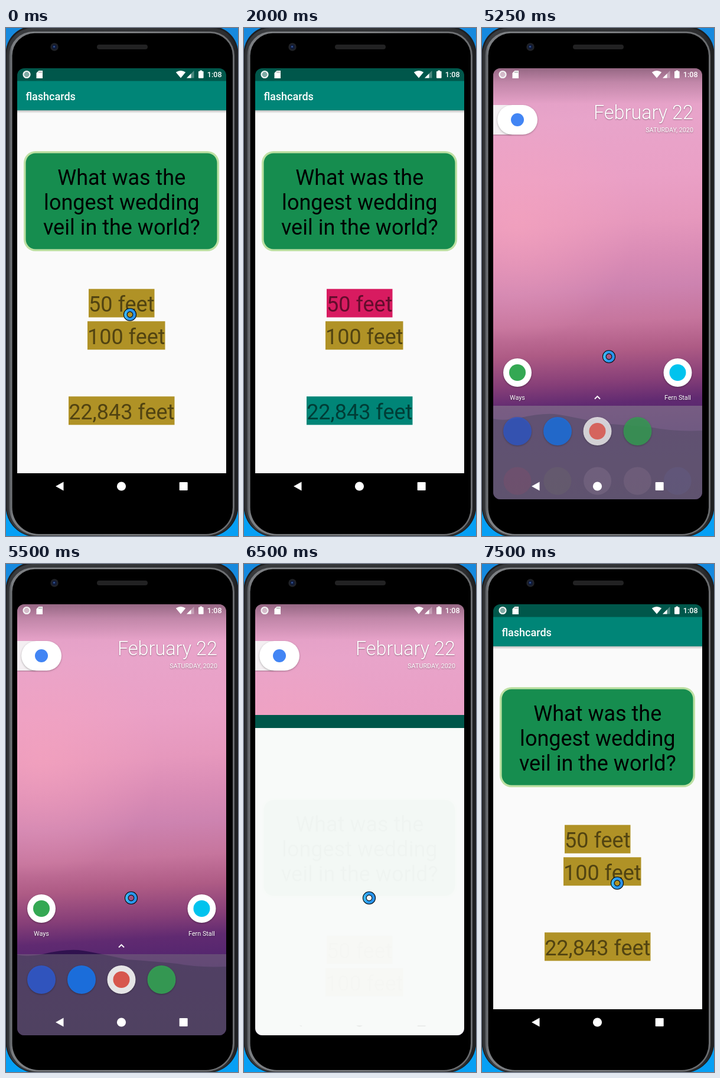
These frames come from a looping animation (393x858 px, 8000 ms). An HTML page with a canvas:

```html
<!DOCTYPE html>
<html lang="en">
<head>
<meta charset="utf-8">
<title>Flashcards</title>
<style>
  html, body { margin: 0; width: 100%; height: 100%; overflow: hidden; background: #1487de; }
  canvas { display: block; width: 393px; height: 858px; }
</style>
</head>
<body>
<canvas id="stage"></canvas>
<script>
const W = 393, H = 858, LOOP = 8000;
const canvas = document.getElementById('stage');
const ratio = window.devicePixelRatio || 1;
canvas.width = Math.round(W * ratio);
canvas.height = Math.round(H * ratio);
const ctx = canvas.getContext('2d');

const SCREEN = { x: 19, y: 68, w: 354, h: 728 };
const GOLD = '#b09226', TEAL = '#008577', DARK_TEAL = '#00574b', PINK = '#d81b60';

// Each step: start time, scene, busy cursor position
const steps = [
  { at: 0, draw: () => app(), cursor: [210, 484] },
  { at: 250, draw: () => app(), cursor: [206, 475] },
  { at: 1000, draw: () => app(true), cursor: [211, 481] },
  { at: 2000, draw: () => app(true) },
  { at: 4750, draw: () => blank(), cursor: [218, 536] },
  { at: 5250, draw: () => home(35), cursor: [215, 555] },
  { at: 5500, draw: () => home(14), cursor: [212, 564] },
  { at: 5750, draw: () => home(0), cursor: [212, 564] },
  { at: 6500, draw: () => opening(255), cursor: [212, 564] },
  { at: 6750, draw: () => app(), cursor: [204, 564] },
  { at: 7250, draw: () => app(), cursor: [229, 539] }
];

function gradient(x0, y0, x1, y1, stops) {
  const g = ctx.createLinearGradient(x0, y0, x1, y1);
  stops.forEach(([p, c]) => g.addColorStop(p, c));
  return g;
}

function rect(x, y, w, h, fill) {
  ctx.fillStyle = fill;
  ctx.fillRect(x, y, w, h);
}

function roundPath(x, y, w, h, r) {
  ctx.beginPath();
  ctx.roundRect(x, y, w, h, r);
}

function round(x, y, w, h, r, fill) {
  roundPath(x, y, w, h, r);
  ctx.fillStyle = fill;
  ctx.fill();
}

function disc(x, y, r, fill) {
  ctx.beginPath();
  ctx.arc(x, y, r, 0, Math.PI * 2);
  ctx.fillStyle = fill;
  ctx.fill();
}

function ring(x, y, r, width, stroke) {
  ctx.beginPath();
  ctx.arc(x, y, r, 0, Math.PI * 2);
  ctx.lineWidth = width;
  ctx.strokeStyle = stroke;
  ctx.stroke();
}

function poly(points, fill) {
  ctx.beginPath();
  points.forEach(([x, y]) => ctx.lineTo(x, y));
  ctx.closePath();
  ctx.fillStyle = fill;
  ctx.fill();
}

function text(str, x, y, size, fill, align = 'center', weight = 400) {
  ctx.font = `${weight} ${size}px Roboto, sans-serif`;
  ctx.textAlign = align;
  ctx.fillStyle = fill;
  ctx.fillText(str, x, y);
}

function shaded(blur, dy, alpha, draw) {
  ctx.save();
  ctx.shadowColor = `rgba(0,0,0,${alpha})`;
  ctx.shadowBlur = blur * ratio;
  ctx.shadowOffsetY = dy * ratio;
  draw();
  ctx.restore();
}

function phone() {
  rect(0, 0, W, H, gradient(0, 0, 0, H, [[0, '#1689de'], [1, '#06a0f5']]));
  round(-0.5, -3, 394, 862.5, [46, 46, 52, 52], '#1d1e20');
  round(1.5, 0, 390, 858.5, [44, 44, 50, 50],
    gradient(0, 0, W, 0, [[0, '#303235'], [0.05, '#3a3c3f'], [0.95, '#2c2d2f'], [1, '#1e1f21']]));
  // Lit inner edge, wider on the left
  round(5.5, 6, 381.5, 851, [41, 41, 48, 48],
    gradient(0, 0, W, 0, [[0.014, '#54575b'], [0.028, '#7b7e82'], [0.5, '#85878a'], [1, '#696b6e']]));
  round(10.5, 8.8, 373.5, 846, [38, 38, 45, 45], '#000');

  round(154, 28, 86, 8, 4, '#222223');
  disc(82, 32, 6.7, '#202227');
  disc(82, 32, 4, '#101a38');
  disc(81.5, 31.5, 1.6, '#315395');
}

function statusIcons() {
  disc(35, 78.5, 4.6, 'rgba(255,255,255,.5)');
  ring(35, 78.5, 5.5, 2.2, '#f5f6f6');
  poly([[55.5, 72], [62, 72], [62, 85], [51.5, 85], [51.5, 76]], '#fff');
  [55.4, 57.5, 59.6].forEach(x => rect(x, 73.5, 1, 2.2, 'rgba(60,70,70,.7)'));

  ctx.beginPath();
  ctx.moveTo(296, 84.5);
  ctx.lineTo(287.8, 74.8);
  ctx.quadraticCurveTo(296, 69, 304.2, 74.8);
  ctx.closePath();
  ctx.fillStyle = '#fff';
  ctx.fill();

  poly([[306, 84.5], [318.5, 84.5], [318.5, 72]], 'rgba(255,255,255,.3)');
  poly([[306, 84.5], [313.5, 84.5], [313.5, 77]], '#fff');
  round(326, 73, 8.6, 11.8, 1, '#fff');
  rect(328.4, 71.6, 3.8, 2, '#fff');
  text('1:08', 365.6, 83.4, 12.6, '#fff', 'right', 500);
}

function navIcons(fill = '#fff') {
  poly([[84, 774], [97.5, 766.5], [97.5, 781.5]], fill);
  disc(195.5, 774, 7.6, fill);
  round(293.7, 767, 14, 14, 1, fill);
}

function answer(str, x, y, w, fill) {
  rect(x, y, w, 48, fill);
  text(str, x + w / 2, y + 38.4, 36, 'rgba(0,0,0,.54)');
}

function cards(marked) {
  round(30, 208, 331, 169, 20, '#bde0a3');
  round(33.5, 211.5, 324, 162, 16.5, '#168d4f');
  ['What was the', 'longest wedding', 'veil in the world?'].forEach((line, i) =>
    text(line, 195.8, 265 + i * 42.2, 36, '#000'));
  answer('50 feet', 140, 440.7, 111.5, marked ? PINK : GOLD);
  answer('100 feet', 138, 495.3, 131.5, GOLD);
  answer('22,843 feet', 106, 622.3, 179.5, marked ? TEAL : GOLD);
}

function app(marked) {
  rect(19, 139, 354, 613, '#fafafa');
  rect(19, 139, 354, 5, gradient(0, 139, 0, 144, [[0, 'rgba(0,0,0,.25)'], [1, 'rgba(0,0,0,0)']]));
  rect(19, 68, 354, 22, DARK_TEAL);
  rect(19, 89.5, 354, 49.5, TEAL);
  text('flashcards', 33.4, 121.7, 18, '#fff', 'left', 500);
  cards(marked);
  rect(19, 752, 354, 44, '#000');
  statusIcons();
  navIcons();
}

function blank() {
  rect(19, 68, 354, 728, '#000');
  statusIcons();
  navIcons();
}

function wallpaper() {
  rect(19, 68, 354, 728, gradient(180, 68, 215, 690, [
    [0, '#e09cc3'], [0.14, '#e8a4ca'], [0.3, '#eaa0c6'], [0.42, '#e698bd'],
    [0.52, '#d98bb5'], [0.6, '#cd83b0'], [0.69, '#c6759d'], [0.77, '#ae5b85'],
    [0.85, '#873f78'], [0.91, '#602a71'], [1, '#4e246d']
  ]));
  const glow = ctx.createRadialGradient(60, 330, 10, 60, 330, 200);
  glow.addColorStop(0, 'rgba(248,165,190,.55)');
  glow.addColorStop(1, 'rgba(248,165,190,0)');
  rect(19, 68, 354, 500, glow);
  rect(19, 68, 354, 60, gradient(0, 68, 0, 128, [
    [0, 'rgba(60,40,55,.45)'], [0.4, 'rgba(60,40,55,.2)'], [1, 'rgba(60,40,55,0)']
  ]));

  ctx.beginPath();
  ctx.moveTo(19, 660);
  ctx.quadraticCurveTo(35, 664, 62, 659);
  ctx.quadraticCurveTo(105, 649, 130, 653);
  ctx.quadraticCurveTo(160, 658, 205, 668);
  ctx.quadraticCurveTo(250, 671, 290, 675);
  ctx.quadraticCurveTo(325, 682, 373, 680);
  ctx.lineTo(373, 796);
  ctx.lineTo(19, 796);
  ctx.fillStyle = gradient(0, 652, 0, 796, [[0, '#30124f'], [1, '#2d1648']]);
  ctx.fill();
}

function tile(x, y, fill, dot) {
  shaded(3, 1, 0.35, () => disc(x, y, 24, fill));
  if (dot) disc(x, y, 14, dot);
}

function dock(lift) {
  const top = 673 - lift, y = 716 - lift, k = lift / 35;
  const base = 110 + 35 * k;
  rect(19, top, 354, 796 - top, `rgba(${base},${base - 2},${base + 5},${0.4 + 0.1 * k})`);
  ctx.save();
  ctx.globalAlpha = 1 - 0.2 * k;
  tile(60, y, '#3058c8');
  tile(128, y, '#1a73e8');
  tile(195.5, y, '#f5f5f5', '#d64a40');
  tile(263.5, y, '#35a154');
  ctx.globalAlpha = k > 0.5 ? 0.13 : 0;
  ['#c04860', '#7d8f60', '#d0b8c8', '#c0a0b0', '#6878b0'].forEach((c, i) =>
    disc(60 + i * 67.8, 800 - lift, 23.5, c));
  ctx.restore();

  ctx.beginPath();
  ctx.moveTo(191, 661.5 - lift);
  ctx.lineTo(195.5, 657 - lift);
  ctx.lineTo(200, 661.5 - lift);
  ctx.strokeStyle = '#fff';
  ctx.lineWidth = 1.9;
  ctx.stroke();
}

function home(lift) {
  wallpaper();
  shaded(2, 1, 0.3, () => round(19, 130, 50, 50, [0, 25, 25, 0], '#f4eff2'));
  shaded(3, 1, 0.3, () => round(26, 130, 68, 50, 25, '#fff'));
  disc(60, 155, 11, '#4285f4');
  shaded(2, 1, 0.35, () => {
    text('February 22', 358, 154.3, 32.4, '#fff', 'right', 300);
    text('SATURDAY, 2020', 358, 176.4, 10.8, '#fff', 'right');
  });
  tile(60, 582, '#fff', '#34a853');
  tile(331.5, 582, '#fff', '#00c3ee');
  dock(lift);
  shaded(2, 1, 0.4, () => {
    text('Ways', 60, 627.6, 10.8, '#fff');
    text('Fern Stall', 331.5, 627.6, 10.8, '#fff');
  });
  statusIcons();
  navIcons();
}

// The app sheet rising over the home screen, its content barely visible
function opening(top) {
  home(0);
  rect(19, top, 354, 796 - top, '#f8faf9');
  rect(19, top, 354, 22, DARK_TEAL);
  ctx.save();
  ctx.globalAlpha = 0.016;
  ctx.translate(0, top - SCREEN.y);
  cards(false);
  ctx.restore();
  ctx.save();
  ctx.beginPath();
  ctx.rect(19, 779.5, 354, 10);
  ctx.clip();
  navIcons('rgba(0,0,0,.07)');
  ctx.restore();
}

function busy(x, y) {
  ring(x, y, 7.7, 6.8, '#050a10');
  ring(x, y, 7.7, 4.6, gradient(x - 10, y, x + 10, y, [[0, '#45c4fa'], [0.4, '#2b9bf0'], [1, '#2a90e8']]));
}

function frame(now) {
  const t = now % LOOP;
  const step = steps.filter(s => s.at <= t).pop() || steps[0];
  ctx.setTransform(ratio, 0, 0, ratio, 0, 0);
  phone();
  ctx.save();
  roundPath(SCREEN.x, SCREEN.y, SCREEN.w, SCREEN.h, 12);
  ctx.clip();
  step.draw();
  ctx.restore();
  if (step.cursor) busy(...step.cursor);
}

const start = performance.now();
function tick() {
  frame(performance.now() - start);
  requestAnimationFrame(tick);
}
tick();
</script>
</body>
</html>
```
